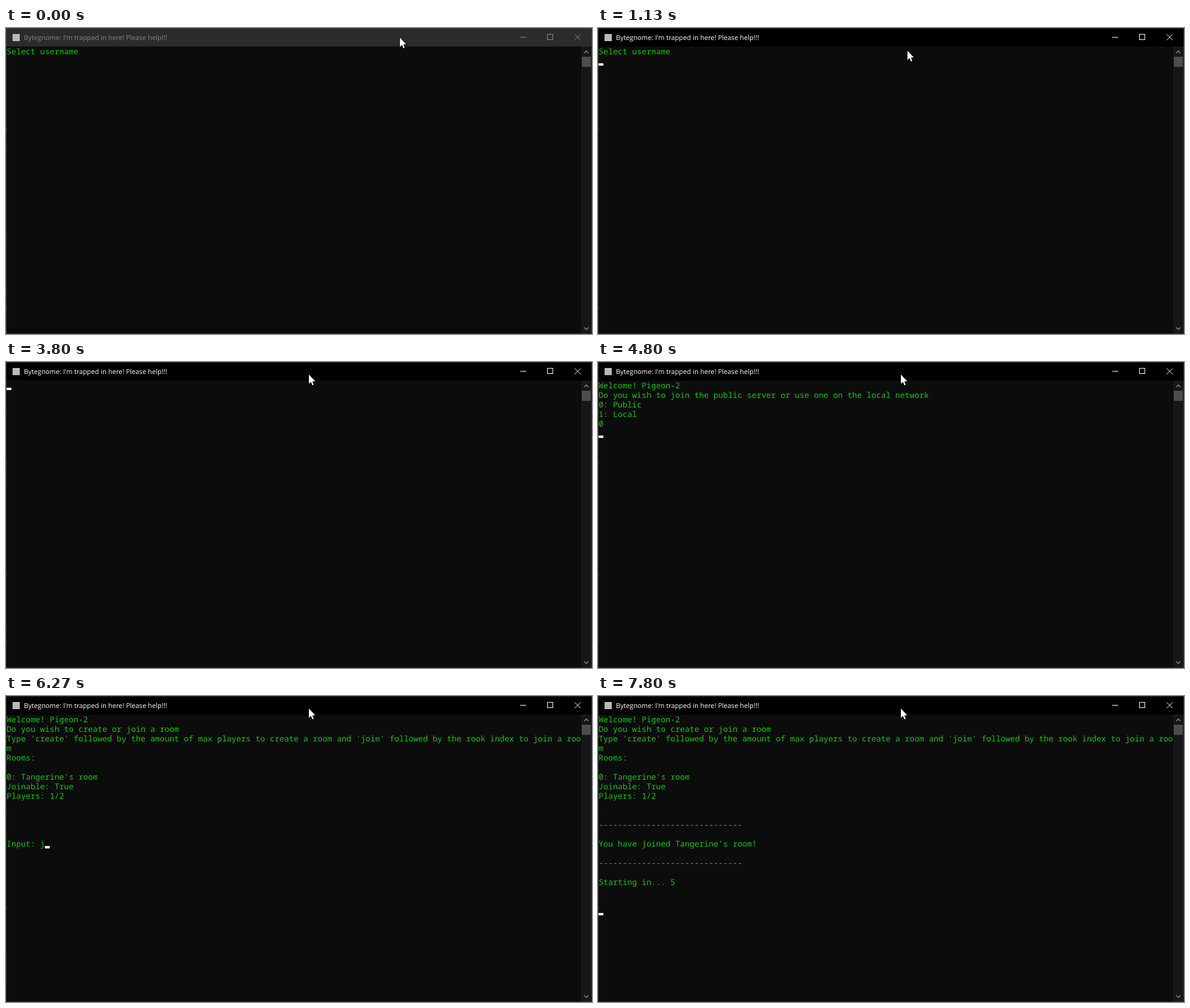
Write an HTML page with a canvas that moves like this. It is 979x512 px and loops after 8 s.

```html
<!DOCTYPE html>
<html lang="en">
<head>
<meta charset="utf-8">
<title>Console lobby</title>
<style>
html, body { margin: 0; width: 100%; height: 100%; overflow: hidden; background: #0c0c0c; }
canvas { display: block; }
</style>
</head>
<body>
<canvas id="stage" width="979" height="512"></canvas>
<script>
const ctx = document.getElementById('stage').getContext('2d');
const LOOP = 8000;
const TICK = 1000 / 15;
const COL = 8, ROW = 16, LEFT = 1, TOP = 31;

const USER = 'Pigeon-2';
const ROOM = "Tangerine's room";
const RULE = '-'.repeat(30);

const login = name => ['Select username', name];
const servers = [
  `Welcome! ${USER}`,
  'Do you wish to join the public server or use one on the local network',
  '0: Public',
  '1: Local'
];
const rooms = [
  `Welcome! ${USER}`,
  'Do you wish to create or join a room',
  "Type 'create' followed by the amount of max players to create a room and 'join' followed by the rook index to join a roo",
  'm',
  'Rooms:',
  '',
  `0: ${ROOM}`,
  'Joinable: True',
  'Players: 1/2',
  '', ''
];
const lobby = input => [...rooms, '', '', 'Input: ' + input];
const joined = [
  ...rooms, RULE, '', `You have joined ${ROOM}!`, '', RULE, '', 'Starting in... 5'
];

// Each state: start time, lines, caret column and row (no caret when omitted).
const states = [];
const show = (time, lines, col, row) => states.push({ time, lines, col, row });
const typeName = (time, count) => show(time, login(USER.slice(0, count)), count, 1);
const typeInput = (time, text) => show(time, lobby(text), 7 + text.length, 13);

show(0, login(''));
typeName(800, 0);
show(1330, login(''));
typeName(1870, 0);
[2130, 2330, 2400, 2600, 2730, 2930, 3070, 3270].forEach((time, i) => typeName(time, i + 1));
show(3600, login(USER), 0, 2);
show(3730, [], 0, 0);
show(3870, servers, 0, 4);
show(4530, [...servers, '0'], 1, 4);
show(4800, [...servers, '0'], 0, 5);
show(4870, [], 0, 0);
show(5000, rooms, 0, 11);
typeInput(5070, '');
show(6130, lobby(''));
typeInput(6270, 'j');
typeInput(6470, 'jo');
typeInput(6600, 'joi');
typeInput(6730, 'join');
typeInput(6870, 'join ');
show(7200, lobby('join '));
typeInput(7400, 'join 0');
show(7600, lobby('join 0'), 0, 14);
show(7670, [], 0, 0);
show(7800, joined, 0, 20);

const mousePath = [
  [0, 658, 16], [130, 640, 38], [270, 591, 97], [330, 591, 97],
  [600, 556, 92], [870, 532, 61], [1330, 506, 21]
];
const ARROW = [[0, 0], [0, 15.6], [3.5, 12.3], [5.9, 18], [8.1, 17.1], [5.8, 11.6], [10.6, 11.3]];
const SPECKS = [
  [84, '#17564a'], [167, '#5c5c5c'], [196, '#7a3d1c'],
  [352, '#5c5c5c'], [439, '#5a5632'], [466, '#5c5c5c']
];

function box(x, y, w, h, color) {
  ctx.fillStyle = color;
  ctx.fillRect(x, y, w, h);
}

function line(points, color, width = 1) {
  ctx.beginPath();
  points.forEach(([x, y]) => ctx.lineTo(x, y));
  ctx.strokeStyle = color;
  ctx.lineWidth = width;
  ctx.stroke();
}

function label(text, x, y, font, color) {
  ctx.font = font;
  ctx.fillStyle = color;
  ctx.fillText(text, x, y);
}

function drawWindow(active) {
  const glyph = active ? '#ffffff' : '#8c8c8c';
  box(0, 0, 979, 512, '#0c0c0c');
  box(0, 0, 979, 31, active ? '#000000' : '#2b2b2b');

  box(11, 10, 12, 12, '#b8b8b8');
  label("Bytegnome: I'm trapped in here! Please help!!!", 30, 20,
    '11.2px "Open Sans", "Noto Sans", sans-serif', active ? '#ffffff' : '#868686');
  line([[859, 15.5], [869, 15.5]], glyph);
  ctx.strokeRect(904.5, 10.5, 9, 9);
  line([[950, 10.5], [960, 20.5]], glyph);
  line([[960, 10.5], [950, 20.5]], glyph);

  box(961, 31, 17, 480, '#171717');
  box(962, 48, 15, 17, '#4d4d4d');
  line([[966, 42], [969.5, 38.5], [973, 42]], '#7c7c7c', 1.6);
  line([[966, 501], [969.5, 504.5], [973, 501]], '#7c7c7c', 1.6);

  ctx.strokeStyle = active ? '#303030' : '#3c3c3c';
  ctx.lineWidth = 1;
  ctx.strokeRect(0.5, 0.5, 978, 511);
  ctx.globalAlpha = active ? 0.7 : 1;
  SPECKS.forEach(([y, color]) => box(0, y, 1, 5, color));
  ctx.globalAlpha = 1;
}

function drawConsole({ lines, col, row }) {
  lines.forEach((text, i) => label(text, LEFT, TOP + i * ROW + 13,
    '13.3333px "Noto Sans Mono", "DejaVu Sans Mono", monospace', '#16c60c'));
  if (row !== undefined) box(LEFT + col * COL, TOP + row * ROW + 12, COL, 4, '#ffffff');
}

function mouseAt(time) {
  const next = mousePath.findIndex(p => p[0] > time);
  if (next < 0) return mousePath[mousePath.length - 1].slice(1);
  const [t0, x0, y0] = mousePath[next - 1];
  const [t1, x1, y1] = mousePath[next];
  const k = (time - t0) / (t1 - t0);
  return [Math.round(x0 + (x1 - x0) * k), Math.round(y0 + (y1 - y0) * k)];
}

function drawMouse([x, y]) {
  ctx.beginPath();
  ARROW.forEach(([dx, dy]) => ctx.lineTo(x + dx, y + dy));
  ctx.closePath();
  ctx.strokeStyle = '#000000';
  ctx.lineWidth = 1.5;
  ctx.stroke();
  ctx.fillStyle = '#ffffff';
  ctx.fill();
}

function draw(now) {
  const time = (now % LOOP) + 5;
  drawWindow(time >= 130);
  drawConsole(states.findLast(s => s.time <= time));
  drawMouse(mouseAt(Math.floor(time / TICK) * TICK));
}

ctx.textRendering = 'geometricPrecision';
const start = performance.now();
function loop() {
  draw(performance.now() - start);
  requestAnimationFrame(loop);
}
loop();
</script>
</body>
</html>
```
